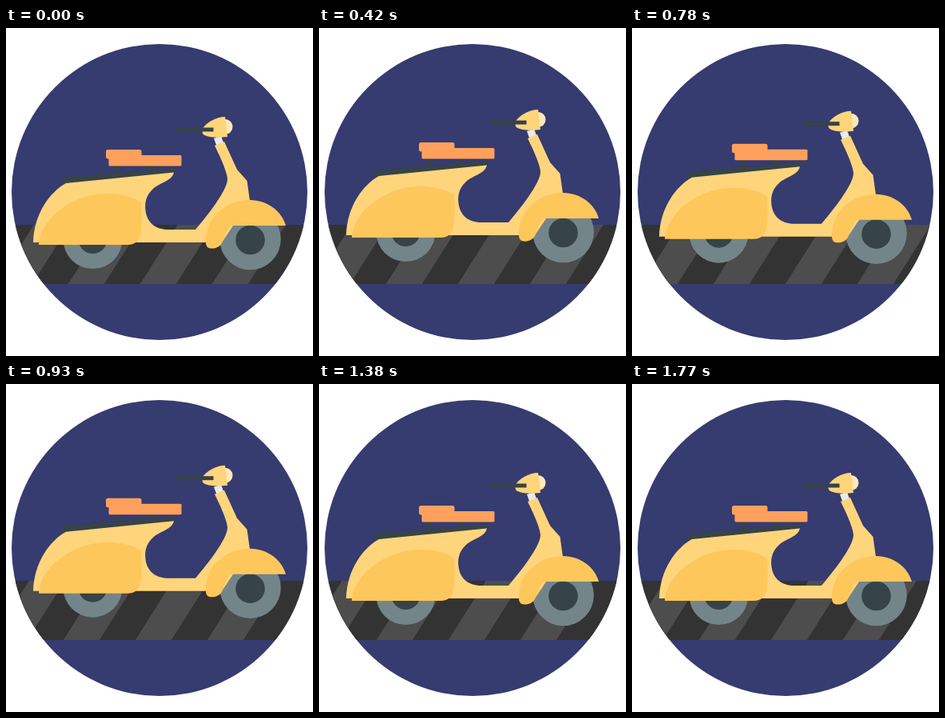
An HTML page for the animation above (1800 ms loop, 384 by 410 pixels).

```html
<!DOCTYPE html>
<html lang="en">
<head>
<meta charset="utf-8">
<title>Scooter ride</title>
<style>
  html, body { margin: 0; width: 100%; height: 100%; overflow: hidden; background: #fff; }
  svg { display: block; width: 100vw; height: 100vh; }
</style>
</head>
<body>
<svg viewBox="0 0 384 410">
  <defs>
    <clipPath id="disc"><circle cx="192" cy="205" r="185"/></clipPath>
  </defs>
  <circle cx="192" cy="205" r="185" fill="#363b70"/>
  <g clip-path="url(#disc)">
    <rect y="246" width="384" height="74" fill="#333"/>
    <path id="stripes" fill="#4d4d4d"/>
  </g>
  <g id="scooter">
    <g fill="#74858a">
      <circle cx="108.5" cy="264" r="37"/>
      <circle cx="305.5" cy="264" r="38.3"/>
    </g>
    <g fill="#364348">
      <circle cx="108.5" cy="264" r="18"/>
      <circle cx="305.5" cy="265" r="18.3"/>
      <path d="M136 171h5v11h-5zM176 171h5v8h-5z"/>
      <path d="M69 191L74 186.5L197 176.5L213 177L210 181L70 195Z"/>
    </g>
    <g fill="#ffa05c">
      <rect x="125" y="152" width="44.5" height="11.5" rx="2.5"/>
      <rect x="128.5" y="159" width="91" height="13.5" rx="1.5"/>
    </g>
    <path fill="#e9eaec" d="M260 138L269 135L273 146L264 149Z"/>
    <path fill="#ffd57b" d="M34 268C35 232 55 205 75 194L210 180.5C208 191 193 193 184 201C174 210 173 221 175 231C178 246 190 252 203 252H237C250 237 277 203 277 189C277 181 268 161 261 147L273 142L289 177L301.500 191L305 216L270 268Z"/>
    <path fill="#fdc75b" d="M41 271C42 240 82 207 127 207C147 207 161 212 169 218C170 230 170 244 168.500 256C167 265 162 271 152 271Z"/>
    <path fill="#fdc75b" d="M250 266C250 237 275 215 305 215C327 215 345 229 350 247H281C274 254 273 262 270 269C266 276 256 277 252 274C250 272 250 269 250 266Z"/>
    <circle cx="274" cy="123.500" r="9.500" fill="#ffe9b9"/>
    <path fill="#ffd57b" d="M245 127C250 118 263 111 274 111L277 136C266 137.500 250 137 246 132Z"/>
    <rect x="213" y="124.500" width="46.500" height="5" fill="#364348"/>
  </g>
</svg>
<script>
  const LOOP = 1800;
  const STRIPE_GAP = 90;
  const ROAD_SPEED = 0.2;
  const stripes = document.getElementById('stripes');
  const scooter = document.getElementById('scooter');

  // Time and height of each turning point of the bumpy ride.
  const bumps = [[0, 0], [180, 0], [450, -10], [675, -5], [900, -10], [1350, 0], [LOOP, 0]];

  function rideHeight(t) {
    const i = bumps.findIndex(([time]) => time > t);
    const [t0, y0] = bumps[i - 1];
    const [t1, y1] = bumps[i];
    return y0 + (y1 - y0) * (t - t0) / (t1 - t0);
  }

  function stripePath(shift) {
    let d = '';
    for (let x = shift - 2 * STRIPE_GAP; x < 384; x += STRIPE_GAP) {
      d += `M${x} 320l47 -74h45l-47 74z`;
    }
    return d;
  }

  function draw(t) {
    stripes.setAttribute('d', stripePath(78 - (t * ROAD_SPEED) % STRIPE_GAP));
    scooter.setAttribute('transform', `translate(0 ${rideHeight(t)})`);
  }

  const start = performance.now();
  function tick() {
    draw((performance.now() - start) % LOOP);
    requestAnimationFrame(tick);
  }
  draw(0);
  requestAnimationFrame(tick);
</script>
</body>
</html>
```
